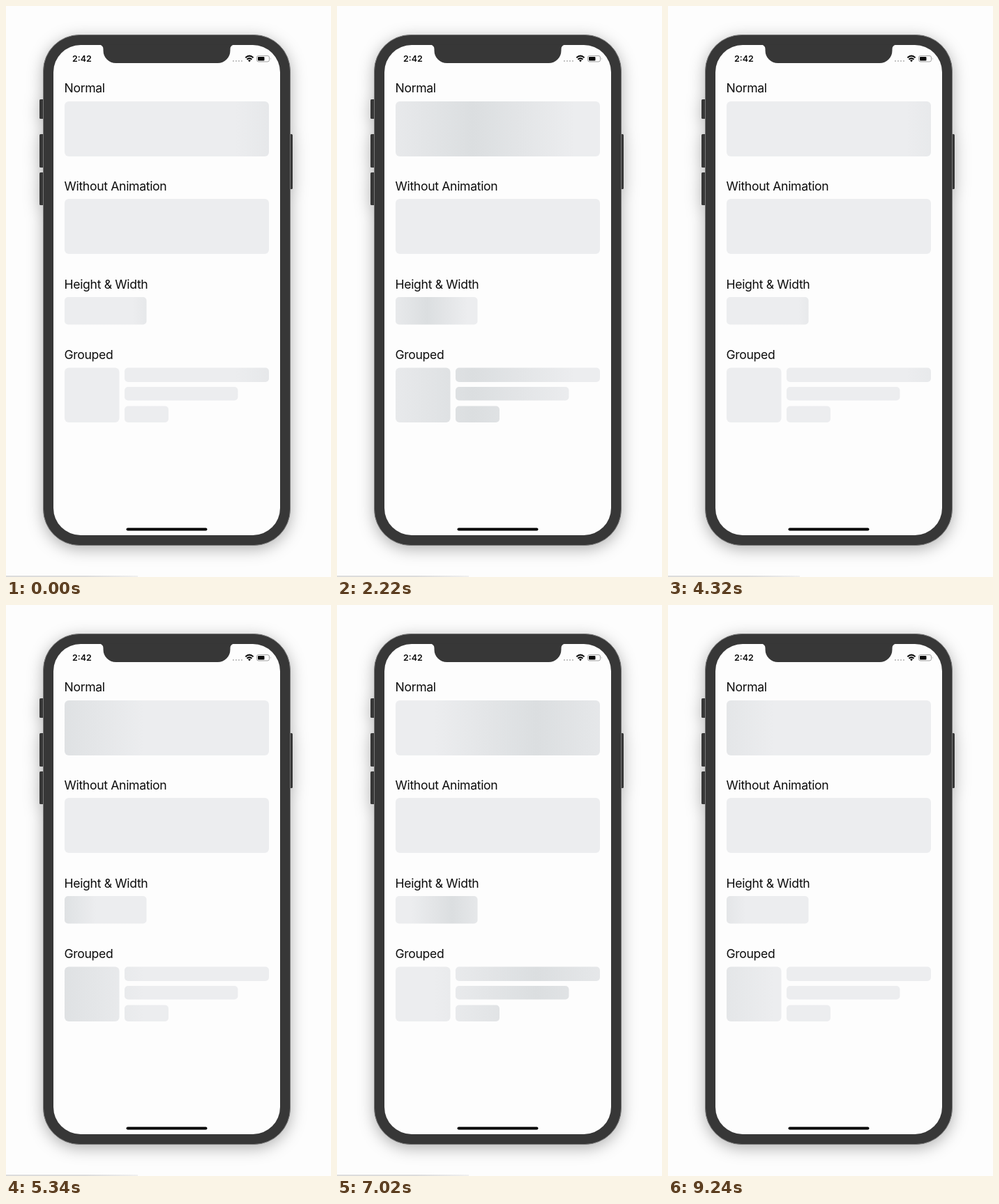
Recreate the animation shown at these times as an HTML page. Size 466 px wide and 820 px high, loop 9.26 s.

```html
<!DOCTYPE html>
<html lang="en">
<head>
<meta charset="utf-8">
<title>Skeleton loading</title>
<style>
  html, body { margin: 0; width: 100%; height: 100%; overflow: hidden; background: #fdfdfd; }
  svg { display: block; width: 466px; height: 820px; }
  text { font-family: Inter, Roboto, sans-serif; fill: #0c0c0c; }
  .label { font-size: 17.6px; letter-spacing: -.33px; }
  .clock { font-size: 12.4px; font-weight: 600; }
  .phone { filter: drop-shadow(0 5px 11px rgba(0, 0, 0, .3)); }
</style>
</head>
<body>
<svg viewBox="0 0 466 820">
  <defs>
    <linearGradient id="wide" gradientUnits="userSpaceOnUse"></linearGradient>
    <linearGradient id="small" gradientUnits="userSpaceOnUse"></linearGradient>
    <linearGradient id="fade">
      <stop offset=".6" stop-color="#dcdcdc"/>
      <stop offset="1" stop-color="#f0f0f0"/>
    </linearGradient>
  </defs>

  <rect id="strip" y="818" width="189" height="2" fill="url(#fade)"/>

  <g class="phone" fill="#373737">
    <rect x="48" y="134" width="8" height="28" rx="1.5"/>
    <rect x="48" y="184" width="8" height="48" rx="1.5"/>
    <rect x="48" y="239" width="8" height="47" rx="1.5"/>
    <rect x="404" y="184" width="7" height="79" rx="1.5"/>
    <rect x="53.5" y="41.5" width="354" height="733" rx="52" stroke="#777"/>
  </g>
  <rect x="68" y="56" width="325" height="704" rx="39" fill="#fdfdfd"/>
  <path d="M133 55.500Q139.500 56 139.500 62V64A18 18 0 0 0 157.500 82H303.500A18 18 0 0 0 321.500 64V62Q321.500 56 328 55.500Z" fill="#373737"/>

  <text class="clock" x="95" y="80">2:42</text>
  <g fill="#b5b5b5">
    <circle cx="326" cy="79" r="1.1"/><circle cx="330" cy="79" r="1.1"/>
    <circle cx="334" cy="79" r="1.1"/><circle cx="338" cy="79" r="1.1"/>
  </g>
  <g fill="none" stroke="#0c0c0c" stroke-width="2">
    <path d="M343.400 74.300Q349 69 354.600 74.300M345.500 76.700Q349 73.500 352.500 76.700"/>
    <path d="M347 78L349 80.400L351 78Q349 76.600 347 78Z" fill="#0c0c0c" stroke="none"/>
  </g>
  <rect x="359.500" y="71.500" width="18" height="8.500" rx="2.500" fill="none" stroke="#a0a0a0"/>
  <rect x="361" y="73" width="9.500" height="5.500" rx="1" fill="#0c0c0c"/>
  <path d="M379 74.300q1.500 1.500 0 3z" fill="#a0a0a0"/>

  <text class="label" x="83.500" y="124">Normal</text>
  <text class="label" x="83.500" y="265">Without Animation</text>
  <text class="label" x="83.500" y="405.500">Height &amp; Width</text>
  <text class="label" x="83.500" y="507">Grouped</text>

  <rect x="84" y="277" width="293" height="79" rx="6" fill="#ecedef"/>
  <rect x="84" y="418" width="117.500" height="39.500" rx="5" fill="url(#small)"/>
  <g fill="url(#wide)">
    <rect x="84" y="137" width="293" height="79" rx="6"/>
    <rect x="84" y="519.500" width="78.500" height="78.500" rx="6"/>
    <rect x="170" y="519.500" width="207" height="20.500" rx="5"/>
    <rect x="170" y="547" width="162.500" height="19.500" rx="5"/>
    <rect x="170" y="574.500" width="63" height="23.500" rx="5"/>
  </g>

  <rect x="172.500" y="749.500" width="116" height="4" rx="2" fill="#000"/>
</svg>
<script>
  const LOOP = 9260, LEFT = 84;
  const SWEEP = 90, START = 7.5;   // in ticks
  const get = id => document.getElementById(id);
  const shimmers = [[get('wide'), 293], [get('small'), 117.5]];

  for (const [gradient] of shimmers)
    gradient.innerHTML = ['#ecedef', '#dbdee0', '#ecedef']
      .map((color, i) => `<stop offset="${i / 2}" stop-color="${color}"/>`).join('');

  // Equal steps of motion, three per 140 ms, held for 20, 100 and 20 ms.
  function tickAt(t) {
    const rest = t % 140;
    return 3 * Math.floor(t / 140) + (rest >= 20) + (rest >= 120);
  }

  function draw() {
    const t = performance.now() % LOOP;
    const phase = (tickAt(t) - START + SWEEP) % SWEEP / SWEEP;
    // The gradient is one block wide and crosses from one width left to one width right.
    for (const [gradient, width] of shimmers) {
      const x = LEFT + (2 * phase - 1) * width;
      gradient.setAttribute('x1', x);
      gradient.setAttribute('x2', x + width);
    }
    get('strip').style.display = t < 8800 ? '' : 'none';
    requestAnimationFrame(draw);
  }
  draw();
</script>
</body>
</html>
```
